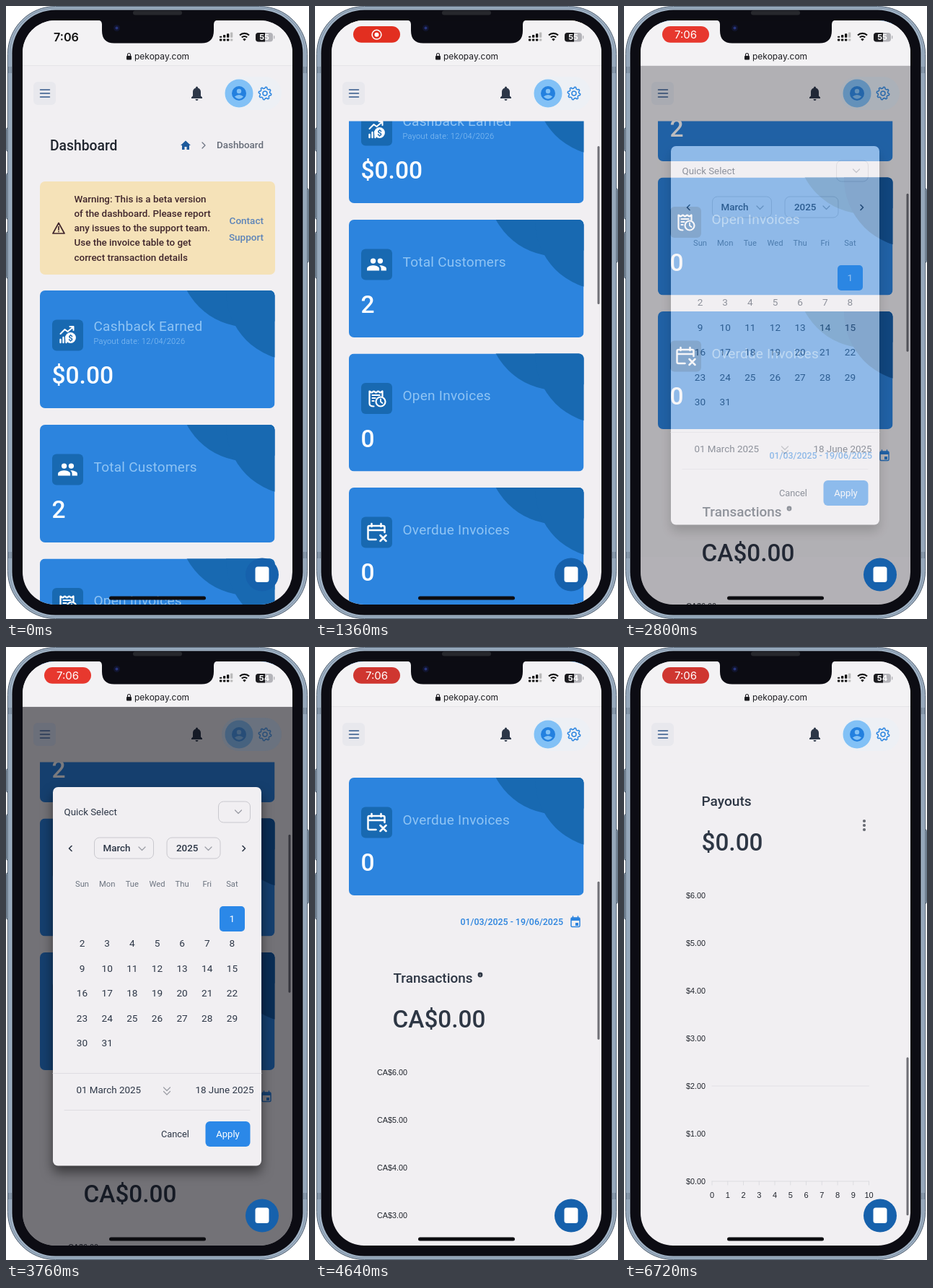
These frames come from a looping animation (420x849 px, 6.8 s). An HTML page:

```html
<!DOCTYPE html>
<html lang="en">
<head>
<meta charset="utf-8">
<style>
html, body { margin: 0; width: 100%; height: 100%; overflow: hidden; background: #fff; }
svg { display: block; position: absolute; left: 0; top: 0; --shade: #1869b1; }
text { font-family: Roboto, sans-serif; white-space: pre; }
.ui text { font-family: Inter, sans-serif; }
.axis text { font-family: "Liberation Sans", Arial, sans-serif; fill: #20242c; }
.shade { fill: var(--shade); }
.sheet { filter: drop-shadow(0 9px 8px rgba(0, 0, 0, .5)); }
</style>
</head>
<body>
<script>
const LOOP = 6800, STEP = 80;
const BG = '#f1eff2', BLUE = '#2c84de', PALE = '#8fc4f4', INK = '#2d3644';

// Scroll offset over time: [ms, px]
const SCROLL = [[0, 0], [80, 4], [240, 30], [480, 108], [720, 172], [960, 196], [1120, 196], [1200, 214],
  [1360, 284], [1520, 382], [1680, 452], [1840, 491], [2000, 504], [2160, 504], [2320, 518], [2480, 528],
  [4160, 528], [4240, 538], [4400, 608], [4640, 770], [4880, 938], [5040, 1066], [5280, 1288], [5440, 1394],
  [5680, 1474], [5920, 1542], [6240, 1624], [6480, 1661], [6720, 1675], [6800, 1675]];

const attrs = o => Object.entries(o).map(([k, v]) => ` ${k}="${v}"`).join('');
const rect = (x, y, w, h, r, fill, more = {}) =>
  `<rect x="${x}" y="${y}" width="${w}" height="${h}" rx="${r}"${attrs({ fill, ...more })}/>`;
const circle = (cx, cy, r, fill, more = {}) => `<circle cx="${cx}" cy="${cy}" r="${r}"${attrs({ fill, ...more })}/>`;
const solid = (d, fill, more = {}) => `<path d="${d}"${attrs({ fill, ...more })}/>`;
const stroke = (d, color, width = 1, more = {}) =>
  solid(d, 'none', { stroke: color, 'stroke-width': width, 'stroke-linecap': 'round', 'stroke-linejoin': 'round', ...more });
// y is the middle of the capital letters
const text = (x, y, size, str, fill, more = {}) =>
  `<text x="${x}" y="${(y + size * .355).toFixed(2)}" font-size="${size}"${attrs({ fill, ...more })}>${str}</text>`;
const group = (x, y, inner, more = {}) => `<g transform="translate(${x} ${y})"${attrs(more)}>${inner}</g>`;
const MID = { 'text-anchor': 'middle' }, END = { 'text-anchor': 'end' }, MEDIUM = { 'font-weight': 500 };
const range = n => [...Array(n).keys()];

const icons = {
  earned: stroke('M-10 6v4M-6 3v7M-2 2v8', '#fff', 2.4) + stroke('M-10-2l6-6 4 3 7-6M3-12h5v5', '#fff', 2) +
    circle(4, 3.5, 7.4, '#fff') + text(4, 3.5, 11.5, '$', '#1869b1', { ...MID, 'font-weight': 700 }),
  people: circle(-4.9, -4.9, 3.7, '#fff') + circle(4.9, -4.9, 3.7, '#fff') +
    solid('M-13.400 8.500v-3C-13.400 2.600-7.700 1.200-4.900 1.200S3.600 2.600 3.600 5.500v3zM6.100 8.500v-3q0-2.500-2.400-4.200C7 .900 13.400 2.600 13.400 5.500v3z', '#fff'),
  open: stroke('M-10 7V-10l3 2 3-2 3 2 3-2 3 2 3-2V-3M-10 7c0 4 4 4 6 4M-6-4.500H4M-6-.500h4M-6 3.500h2', '#fff', 2.2) +
    circle(5.5, 4.5, 6.5, '#1869b1', { class: 'shade', stroke: '#fff', 'stroke-width': 2.2 }) +
    stroke('M5.500 1v3.500l2.500 2', '#fff', 1.8),
  overdue: stroke('M-1 10h-9q-2 0-2-2V-7q0-2 2-2H9q2 0 2 2V0M-12-3H11M-7-12v4M6-12v4M5 4l8 8M13 4l-8 8', '#fff', 2.5)
};

function card(top, name, icon, value, note) {
  const titleY = note ? 49 : 58;
  return group(47, top, `<g clip-path="url(#card)">` + rect(0, 0, 325.5, 163, 0, BLUE) +
    circle(288, -45, 95.5, '#1869b1') + circle(354, 1, 96, '', { class: 'shade' }) + '</g>' +
    rect(17, 40.5, 43, 43, 6, '', { class: 'shade' }) + group(38.5, 62, icons[icon]) +
    text(74.5, titleY, 19, name, PALE, { 'letter-spacing': .25 }) +
    (note ? text(74.5, 70.5, 11, note, PALE, { 'letter-spacing': .3, 'font-weight': 300 }) : '') +
    text(16.5, 117.5, 33.5, value, '#fff', MEDIUM));
}

// Labels 6..0 up the side, 0..10 along the base
function chart(top, unit, left, line) {
  const dx = (339.5 - left) / 10, base = top + 396, lineY = base - line * 66;
  return '<g class="axis">' +
    range(7).map(i => text(86, top + i * 66, 10.8, `${unit}${6 - i}.00`)).join('') +
    range(11).map(i => text(left + i * dx, base + 19, 11, i, INK, MID) +
      stroke(`M${left + i * dx} ${base}v5`, '#dcdce0')).join('') +
    stroke(`M${left} ${base}H339.500`, '#dcdce0') + stroke(`M${left} ${lineY}H339.500`, '#e2e1e5') + '</g>';
}

const warning = ['Warning: This is a beta version', 'of the dashboard. Please report', 'any issues to the support team.',
  'Use the invoice table to get', 'correct transaction details'];

const page =
  text(61, 193, 19.3, 'Dashboard', '#20252e', MEDIUM) +
  solid('M242 193l7-6.500 7 6.500h-2v6h-3.500v-4h-3v4H244v-6z', '#1d5a9c') +
  stroke('M272 189l4 4-4 4', '#6b7280', 1.2) +
  text(357, 192.5, 13.4, 'Dashboard', '#666c78', { ...END, ...MEDIUM }) +
  rect(47, 243, 326, 129, 7, '#f5e2b8') +
  warning.map((s, i) => text(94.5, 267 + i * 20.2, 13.4, s, '#40262c', MEDIUM)).join('') +
  stroke('M73 300.500l8 14.500H65zM73 305.500v4.500M73 312.300v.200', '#40262c', 1.7) +
  text(357, 297, 13.5, 'Contact', '#5d84b8', { ...END, ...MEDIUM }) +
  text(357, 320.5, 13.5, 'Support', '#5d84b8', { ...END, ...MEDIUM }) +
  card(394, 'Cashback Earned', 'earned', '$0.00', 'Payout date: 12/04/2026') +
  card(580, 'Total Customers', 'people', '2') +
  card(765.5, 'Open Invoices', 'open', '0') +
  card(951, 'Overdue Invoices', 'overdue', '0') +
  text(344, 1150.5, 12.4, '01/03/2025 - 19/06/2025', BLUE, { ...END, ...MEDIUM }) +
  group(361, 1151, rect(-6, -6, 12, 12.5, 1.5, 'none', { stroke: BLUE, 'stroke-width': 1.5 }) +
    rect(-6, -6, 12, 4, 0, BLUE) + rect(0, 1, 4, 4, 0, BLUE) + stroke('M-3.500-8v2M3.500-8v2', BLUE, 1.5)) +
  text(108.5, 1228, 18.9, 'Transactions', INK, MEDIUM) +
  circle(229, 1224, 3.4, INK) + stroke('M229 1223.500v2', '#ccc', .8) +
  text(107.5, 1285.5, 33.3, 'CA$0.00', INK, MEDIUM) + chart(1359, 'CA$', 137, 1) +
  text(107.5, 1888, 19.1, 'Payouts', INK, MEDIUM) + text(107.5, 1945.5, 33.3, '$0.00', INK, MEDIUM) +
  [-6, 0, 6].map(d => circle(333, 1922 + d, 2.1, '#666a72')).join('') + chart(2019, '$', 122, 2);

// Outline of eight teeth, four corners each
const gear = 'M' + range(32).map(i => {
  const a = (i + .5) * Math.PI / 16, r = i % 4 < 2 ? 8.8 : 6.8;
  return `${(r * Math.cos(a)).toFixed(2)} ${(r * Math.sin(a)).toFixed(2)}`;
}).join('L') + 'z';

const header = rect(23, 83, 374, 76.5, 0, BG) +
  rect(302, 98, 80, 46, 23, '#edf0f5') + rect(38, 105, 31, 32, 6, '#e8e8ed') +
  stroke('M47.500 116h13M47.500 121h13M47.500 126h13', '#35598c', 1.5) +
  solid('M257 128v-1.500l2-2V119c0-3 1.500-5 4-5.600V113a1.500 1.500 0 0 1 3 0v.400c2.500.600 4 2.600 4 5.600v5.500l2 2v1.500zM262.500 129h4a2 2 0 0 1-4 0z', '#2d3748') +
  circle(323, 121, 19.5, '#82c1f6') + circle(323, 121, 10, '#2380df') + circle(323, 118, 3.2, '#82c1f6') +
  solid('M316.800 125.500q6.200-5 12.400 0q-6.200 6.500-12.400 0z', '#82c1f6') +
  group(359, 121, stroke(gear, '#2d86e0', 1.5) + circle(0, 0, 3, 'none', { stroke: '#2d86e0', 'stroke-width': 1.5 }));

const box = (x, y, w) => rect(x, y, w, 29, 7, 'none', { stroke: '#c9c8ce' });
const down = (x, y) => stroke(`M${x - 4.5} ${y - 2}l4.500 4.500 4.500-4.500`, '#9a9ca4', 1.2);
const NAVY = '#2c3646', dayX = i => 105.5 + i * 34.65;
const days = range(31).map(i => {
  const cell = i + 6, y = 376 + Math.floor(cell / 7) * 34.5;
  return text(dayX(cell % 7), y, 13.6, i + 1, i ? NAVY : '#fff', MID);
}).join('');

const dim = rect(23, 83, 374, 746, 0, '#000008', { 'fill-opacity': .52 }) +
  rect(299, 98, 83, 46, 23, '#5a708c', { 'fill-opacity': .3 }) +
  rect(38, 105, 31, 32, 6, '#5a708c', { 'fill-opacity': .2 });

const modal = rect(65, 194, 289, 524.5, 7, BG, { class: 'sheet' }) +
  text(80.5, 228, 13.3, 'Quick Select', NAVY) + box(294.5, 214, 44) + down(322, 228) +
  stroke('M91 275.500l-3.500 3.500 3.500 3.500M328 275.500l3.500 3.500-3.500 3.500', NAVY, 1.6) +
  box(122.5, 264, 82) + text(134.5, 278.5, 13.4, 'March', NAVY, MEDIUM) + down(188.5, 279) +
  box(223, 264, 74) + text(236, 278.5, 13.4, '2025', NAVY, MEDIUM) + down(280.5, 279) +
  'Sun Mon Tue Wed Thu Fri Sat'.split(' ').map((d, i) => text(dayX(i), 328.5, 11.2, d, '#6c7480', MID)).join('') +
  rect(296, 359, 35, 35, 5, '#2b88e8') + days +
  stroke('M65 590.500H354M81 641.500H338', '#dedde2') +
  text(97.5, 613.5, 13.4, '01 March 2025', NAVY) + text(343.5, 613.5, 13.4, '18 June 2025', NAVY, END) +
  down(223, 612) + down(223, 617.5) +
  text(234.5, 674.5, 12.8, 'Cancel', NAVY, MID) +
  rect(276.5, 657, 62, 35, 6, '#2b88e8') + text(307.5, 674.5, 13, 'Apply', '#fff', MID);

const status = rect(23, 20, 374, 63, 0, '#f3f2f4') + stroke('M23 82.500H397', '#e6e5e8') +
  text(178, 70, 12, 'pekopay.com', '#1c1c20') +
  rect(167, 69, 7, 5.5, 1, '#1c1c20') + stroke('M168.500 69v-1.500a2 2 0 0 1 4 0V69', '#1c1c20', 1.1) +
  range(4).map(i => {
    const color = i < 3 ? '#111' : '#bbb', h = 2 + i * 1.7;
    return rect(296 + i * 5, 45.5, 3.3, 3, .8, color) + rect(296 + i * 5, 43.7 - h, 3.3, h, .8, color);
  }).join('') +
  stroke('M324 40.500a9.500 9.500 0 0 1 13 0M326.800 43.500a5.500 5.500 0 0 1 7.400 0', '#111', 2.2, { 'stroke-linecap': 'butt' }) +
  solid('M330.500 48.500l-2.300-2.500a3.400 3.400 0 0 1 4.600 0z', '#111') +
  rect(346, 37, 24, 12.5, 4, '#b3b3b8') + solid('M350 37h9v12.500h-9a4 4 0 0 1-4-4V41a4 4 0 0 1 4-4z', '#1b1b1e') +
  rect(371, 41, 1.4, 4.5, .7, '#b3b3b8') +
  text(358, 43.3, 11, '55', '#fff', { ...MID, 'font-weight': 700, id: 'battery' }) +
  rect(53, 28, 65, 22.7, 11.35, '#e22f20', { id: 'pill' }) +
  text(83.5, 43, 16.2, '7:06', '#111', { ...MID, 'font-weight': 600, id: 'clock' }) +
  `<g id="rec">${circle(85.5, 39.7, 6.4, 'none', { stroke: '#fff', 'stroke-width': 1.5 })}${circle(85.5, 39.7, 3, '#fff')}</g>`;

const buttons = [[.5, 169, 32], [.5, 232, 63], [.5, 313, 64], [414.5, 253, 102]]
  .map(([x, y, h]) => rect(x, y, 5, h, 1.5, '#9fb0c0', { stroke: '#4d5b6c' })).join('');
const phone = buttons + rect(2.5, .5, 415, 848, 66, '#a3b5c7', { stroke: '#4d5b6c' }) +
  rect(5.5, 3, 409, 843, 63, 'none', { stroke: '#8799ad', 'stroke-width': 1.5 }) +
  [[3, 84], [412, 84], [3, 756], [412, 756]].map(([x, y]) => rect(x, y, 5, 9, 0, '#8495a7')).join('') +
  rect(8.5, 5.5, 403, 838, 60, '#0c0c13');
const notch = solid('M127 19.500q6 0 6 6V34q0 17.500 17 17.500H271q17 0 17-17.500V25.500q0-6 6-6z', '#0c0c13') +
  circle(153.5, 30.5, 4.5, '#11142e') + circle(153.5, 30.5, 2, '#27357c') +
  rect(176, 6.5, 68, 6, 3, '#26272c');
const chat = circle(355, 787.5, 23, '#1661ac') + rect(345.5, 776.5, 19, 21.5, 3.5, '#fff');

document.body.innerHTML = `<svg width="420" height="849" viewBox="0 0 420 849"><defs>
  <clipPath id="card">${rect(0, 0, 325.5, 163, 7, '#000')}</clipPath>
  <clipPath id="screen">${rect(23, 20, 374, 809, 45, '#000')}</clipPath></defs>
  ${phone}<g clip-path="url(#screen)">${rect(23, 20, 374, 809, 0, BG)}<g id="page">${page}</g>
  ${header}${rect(391.5, 0, 3, 219, 1.5, '#707076', { id: 'bar' })}
  <g id="modal">${dim}${modal}</g>
  ${chat}<g class="ui">${status}</g>${rect(143, 817.5, 134, 5, 2.5, '#0c0c10')}</g>${notch}</svg>`;

const svg = document.querySelector('svg');
const [pageEl, bar, modalEl, battery, pill, clock, rec] =
  ['page', 'bar', 'modal', 'battery', 'pill', 'clock', 'rec'].map(id => document.getElementById(id));

function scrollAt(t) {
  const i = SCROLL.findIndex(([at]) => at > t), [t0, a] = SCROLL[i - 1], [t1, b] = SCROLL[i];
  return a + (b - a) * (t - t0) / (t1 - t0);
}
const show = (el, opacity) => { el.style.opacity = opacity; };

function draw(now) {
  const t = Math.floor(now % LOOP / STEP) * STEP, s = scrollAt(t);
  pageEl.setAttribute('transform', `translate(0 ${-s})`);
  bar.setAttribute('y', 117.6 + s * .269);
  show(bar, t < STEP || (t > 3840 && t < 4240) ? 0 : 1);
  show(modalEl, t < 2800 || t >= 4240 ? 0 : t < 2880 ? .5 : 1);
  svg.style.setProperty('--shade', t >= 1760 && t < 4240 ? '#165ea8' : '#1869b1');

  const plain = t < STEP, recording = !plain && t < 2480;
  show(pill, plain ? 0 : 1);
  show(rec, recording ? 1 : 0);
  show(clock, recording ? 0 : 1);
  pill.setAttribute('fill', t < 2480 ? '#e22f20' : t < 4240 ? '#e7382e' : '#cf3630');
  const look = { x: plain ? 83.5 : 85.5, y: plain ? 48.8 : 45.3, 'font-size': plain ? 16.2 : 15,
    'font-weight': plain ? 600 : 400, fill: plain ? '#111' : '#fff' };
  for (const k in look) clock.setAttribute(k, look[k]);
  battery.textContent = t < 2960 ? '55' : '54';
}

const start = performance.now();
(function tick() {
  draw(performance.now() - start);
  requestAnimationFrame(tick);
})();
</script>
</body>
</html>
```
